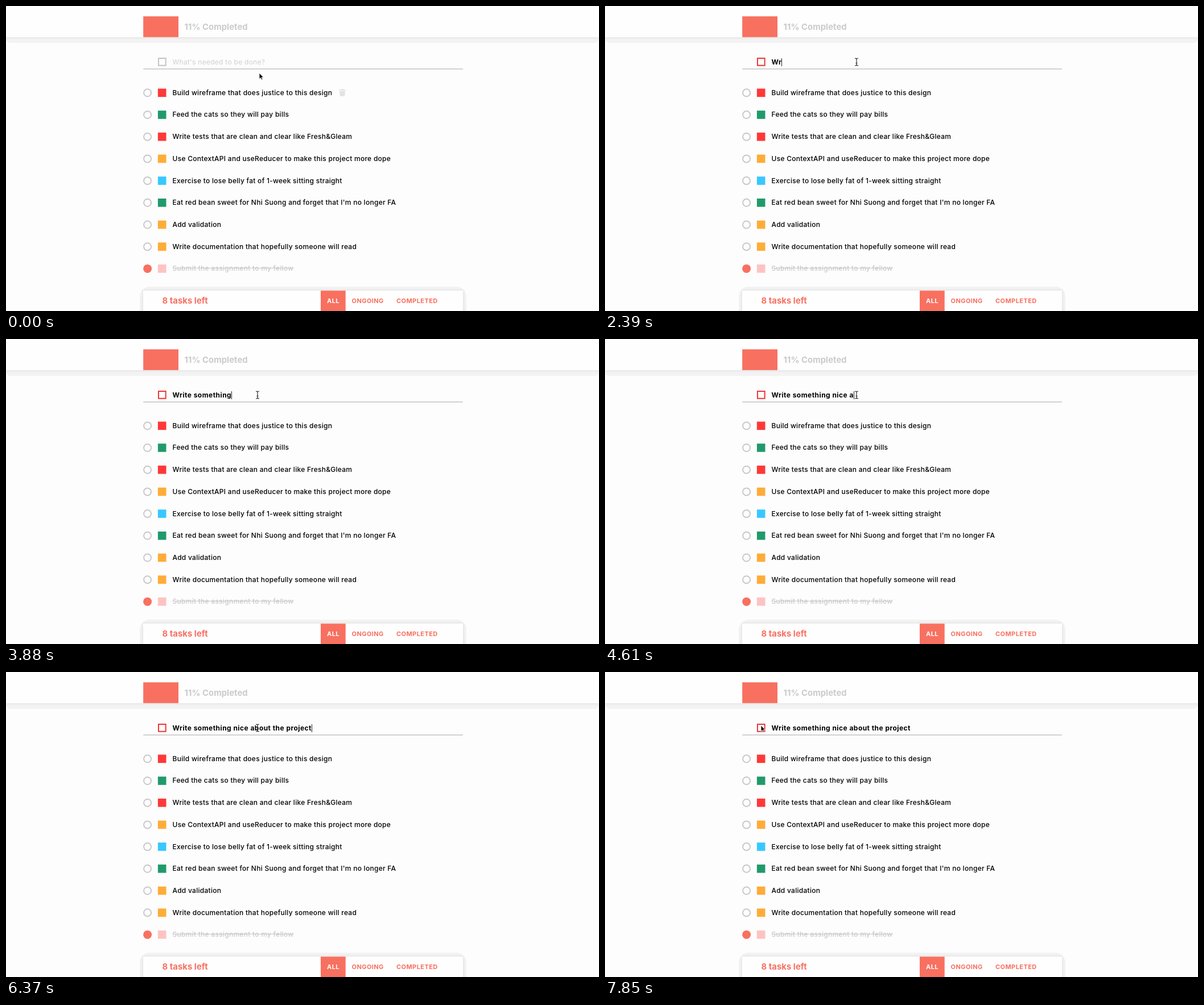
Recreate the animation shown at these times as an HTML page. Size 1042x537 px, loop 8000 ms.

```html
<!DOCTYPE html>
<html lang="en">
<head>
<meta charset="utf-8">
<title>Task list</title>
<style>
  :root { --coral: #f87060; --red: #ff3838; --green: #219a6b; --amber: #ffac38; --sky: #38c8ff; --grey: #c9c9c9; }
  * { box-sizing: border-box; }
  html, body { margin: 0; width: 100%; height: 100%; overflow: hidden; background: #fdfdfd; }
  body { position: relative; font: 500 12px/16px Inter, "Open Sans", sans-serif; letter-spacing: .27px; color: #000; }
  div, main, svg { position: absolute; white-space: pre; }
  svg, main { left: 0; top: 0; }

  .sheet { background: #fefefe; box-shadow: 0 0 5px #0000001c; }
  .sheet.top { left: 0; top: 0; width: 1042px; height: 55px; }
  .sheet.low { left: 241px; top: 501px; width: 562px; height: 40px; }
  .glow { background: #f3f3f3; }
  .glow.top { left: 0; top: 40px; width: 1042px; height: 25px; border-radius: 0 0 8px 8px; }
  .glow.low { left: 235px; top: 494px; width: 574px; height: 60px; border-radius: 18px 18px 0 0; }

  .big { font-size: 14.8px; font-weight: 700; line-height: 20px; letter-spacing: .06px; }
  .done { left: 313.5px; top: 26.5px; color: #cbcbcb; }
  .left { left: 274.5px; top: 509px; color: var(--coral); }
  .tab { top: 511px; font-size: 11px; font-weight: 700; letter-spacing: .42px; color: var(--coral); }

  .entry { left: 292.5px; top: 90.5px; }
  .hint { font-weight: 400; color: #cfcfcf; }
  .typed { font-weight: 700; letter-spacing: .45px; }
  #caret { display: inline-block; width: 1px; height: 14px; margin-right: -1px; vertical-align: -3px; background: #222; }
  #box { fill: none; stroke: #c4c4c4; stroke-width: 2; }
  #box.on { stroke: #f03535; }

  .label { left: 292.5px; }
  .label.off { color: var(--grey); text-decoration: line-through; }
  .ring { fill: none; stroke: var(--grey); stroke-width: 2; }
  .ring.off { fill: var(--coral); stroke: var(--coral); }
  .tag.off { opacity: .3; }
</style>
</head>
<body>
  <div class="glow top"></div>
  <div class="sheet top"></div>
  <div class="glow low"></div>
  <div class="sheet low"></div>

  <svg width="1042" height="537" viewBox="0 0 1042 537">
    <g fill="#f87060">
      <rect x="241.2" y="18.2" width="61.8" height="36.6"/>
      <rect x="553" y="501.2" width="43.7" height="36"/>
    </g>
    <rect x="241.2" y="110.1" width="561.6" height="1.5" fill="#c4c4c4"/>
    <rect id="box" x="268" y="92" width="12.7" height="12.7"/>
    <g id="marks"></g>
    <g id="bin" fill="#e3e3e3">
      <path d="M585 147h3.5l.8-1h3.4l.8 1h3.5v1.6h-12z"/>
      <path d="M586 149.5h10l-.7 8.3q-.1 1-1.1 1h-6.4q-1 0-1.1-1z"/>
    </g>
  </svg>

  <div class="big done">11% Completed</div>
  <div class="entry hint" id="hint">What's needed to be done?</div>
  <div class="entry typed"><span id="text"></span><i id="caret"></i></div>
  <main id="list"></main>
  <div class="big left">8 tasks left</div>
  <div class="tab" style="left:564px;color:#fff">ALL</div>
  <div class="tab" style="left:607.5px">ONGOING</div>
  <div class="tab" style="left:686px">COMPLETED</div>

  <svg width="1042" height="537" viewBox="0 0 1042 537">
    <path id="arrow" d="M0 0V10.6L2.5 8.4 4.1 12.1 6 11.3 4.4 7.7H7.6Z" fill="#111" stroke="#fff" stroke-width=".8"/>
    <path id="beam" d="M-3-6.5Q0-6.5 0-4.8Q0-6.5 3-6.5M0-5V5M-3 6.5Q0 6.5 0 4.8Q0 6.5 3 6.5M-1.5 2H1.5" fill="none" stroke="#222" stroke-width="1.1"/>
  </svg>

<script>
  const LOOP = 8000;
  const $ = id => document.getElementById(id);
  const phrase = "Write something nice about the project";

  const tasks = [
    ["red", "Build wireframe that does justice to this design"],
    ["green", "Feed the cats so they will pay bills"],
    ["red", "Write tests that are clean and clear like Fresh&Gleam"],
    ["amber", "Use ContextAPI and useReducer to make this project more dope"],
    ["sky", "Exercise to lose belly fat of 1-week sitting straight"],
    ["green", "Eat red bean sweet for Nhi Suong and forget that I'm no longer FA"],
    ["amber", "Add validation"],
    ["amber", "Write documentation that hopefully someone will read"],
    ["red", "Submit the assignment to my fellow"]
  ];

  tasks.forEach(([color, words], i) => {
    const mid = 152.8 + i * 38.7;
    const state = i === tasks.length - 1 ? "off" : "";
    $("marks").innerHTML += `<circle class="ring ${state}" cx="248.6" cy="${mid}" r="6.5"/>
      <rect class="tag ${state}" x="266.9" y="${mid - 7.3}" width="14.6" height="14.6" fill="var(--${color})"/>`;
    const label = document.createElement("div");
    label.className = "label " + state;
    label.style.top = mid - 8.1 + "px";
    label.textContent = words;
    $("list").append(label);
  });

  // [time, letters typed]
  const typing = [
    [0, 0], [2240, 1], [2390, 2],
    [2690, 4], [2840, 5], [2990, 7], [3130, 8], [3280, 10], [3430, 11], [3580, 12], [3730, 13],
    [3880, 15], [4030, 16], [4170, 18], [4320, 19], [4460, 21], [4610, 22], [4760, 23], [4900, 24],
    [5050, 26], [5190, 28], [5340, 29], [5480, 31],
    [5780, 33], [5930, 34], [6070, 36], [6220, 37], [6370, 38]
  ];
  // [time, caret shown]
  const blink = [[0, 0], [600, 1], [1050, 0], [1500, 1], [2090, 0], [2240, 1], [6970, 0], [7420, 1], [7850, 0]];
  // [time, pointer, x, y]
  const moves = [
    [0, "arrow", 445, 118], [150, "arrow", 443, 112], [300, "beam", 442, 101], [450, "beam", 442, 98.5],
    [6970, "beam", 400, 98], [7120, "arrow", 296, 83], [7270, "arrow", 273, 85],
    [7420, "arrow", 272, 89], [7560, "arrow", 273, 92], [7710, "arrow", 274, 93], [7850, "arrow", 274, 94]
  ];

  const at = (steps, t) => steps.findLast(s => s[0] <= t);
  const show = (id, on) => { $(id).style.visibility = on ? "visible" : "hidden"; };

  function draw(t) {
    const count = at(typing, t)[1];
    const [, kind, x, y] = at(moves, t);
    $("text").textContent = phrase.slice(0, count);
    $("box").classList.toggle("on", count > 0);
    show("hint", t < 600);
    show("bin", t < 150);
    show("caret", at(blink, t)[1]);
    for (const id of ["arrow", "beam"]) {
      show(id, id === kind);
      $(id).setAttribute("transform", `translate(${x} ${y})`);
    }
  }

  const start = performance.now();
  function tick(now) {
    draw(Math.max(0, now - start) % LOOP);
    requestAnimationFrame(tick);
  }
  draw(0);
  requestAnimationFrame(tick);
</script>
</body>
</html>
```
